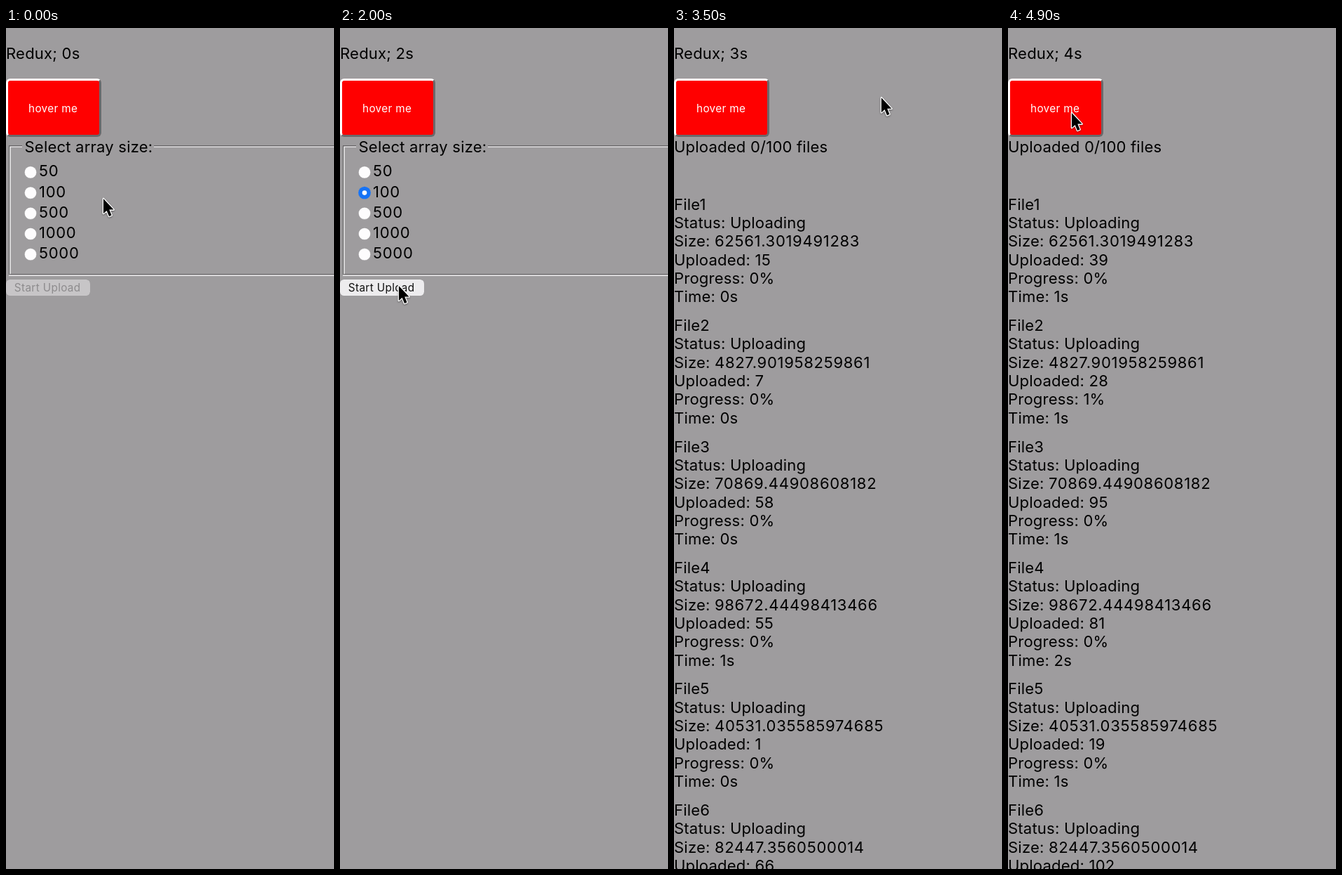
Animation of 468x1197 px, one loop 5 s. Source, as an HTML page:

```html
<!DOCTYPE html>
<html lang="en">
<head>
<meta charset="utf-8">
<title>Upload demo</title>
<style>
  html, body { margin: 0; width: 100%; height: 100%; overflow: hidden; background: #9e9c9e; }
  svg { display: block; position: absolute; left: 0; top: 0; }
  text { font: 22.1px Inter, "Noto Sans", sans-serif; letter-spacing: .18px; white-space: pre; }
  .number { letter-spacing: .65px; }
  .small { font-size: 15.3px; letter-spacing: .35px; }
  #hover {
    position: absolute; left: 0; top: 72px; width: 136px; height: 83px;
    box-sizing: border-box; border: 3px solid; border-radius: 6px;
    border-color: #fff #6b696b #6b696b #fff;
  }
  .dark { stroke: #666466; stroke-width: 1.4; fill: none; }
  .light { stroke: #efeeef; stroke-width: 1.4; fill: none; }
  .radio { fill: #fdfcfd; stroke: #868486; stroke-opacity: .45; stroke-width: .8; }
  #upload { filter: drop-shadow(0 .7px .7px #0005); }
  #cursor { filter: drop-shadow(0 1.5px 1.2px #0006); }
</style>
</head>
<body>
<div id="hover"></div>
<svg width="468" height="1197" viewBox="0 0 468 1197">
  <text id="clock" x="0" y="44"></text>
  <text class="small" x="32" y="120" fill="#fff">hover me</text>
  <g id="form">
    <path class="dark" d="M23 167.7H4.6V352M211 167.7H468M6 350.8H468"/>
    <path class="light" d="M23 169.1H6V350M211 169.1H468M4 352.2H468"/>
    <text x="26.5" y="177">Select array size:</text>
    <g id="options"></g>
    <g id="picked">
      <circle cx="35" cy="234.6" r="8.9" fill="#1673f5"/>
      <circle cx="35" cy="234.6" r="3.3" fill="#fff"/>
    </g>
    <rect id="upload" x="0" y="358" width="120" height="23" rx="5.5"/>
    <text id="uploadLabel" class="small" x="11.8" y="375">Start Upload</text>
  </g>
  <g id="list">
    <text x="0" y="177">Uploaded 0/100 files</text>
  </g>
  <path id="cursor" d="M0 0V21L4.7 16.9 8.1 25 11.6 23.5 8.3 15.6H14.6Z"
        fill="#000" stroke="#fff" stroke-width="2.6" stroke-linejoin="round" paint-order="stroke"/>
</svg>
<script>
const LOOP = 5000, STEP = 100;
const PICK = 800, PRESS = 1900, RELEASE = 2200, SHOW = 2300;
const UPLOAD_START = 2500, UPLOAD_SPAN = 2400;
const $ = id => document.getElementById(id);

// Stops of the pointer tip; it eases from one to the next.
const STOPS = [
  { t: 0, x: 138, y: 242 },
  { t: 400, x: 78, y: 291 },
  { t: PICK, x: 34, y: 232 },
  { t: 1400, x: 82, y: 365 },
  { t: 2100, x: 83, y: 366 },
  { t: 2600, x: 192, y: 171 },
  { t: 3410, x: 316, y: 97 },
  { t: 3905, x: 50, y: 112 },
  { t: 4400, x: 316, y: 97 },
  { t: 4800, x: 269, y: 101 },
  { t: 4900, x: 90, y: 120 }
];

// Counts grow to `total` along a power curve; `start` is when the file's own clock begins.
const FILES = [
  { size: "62561.3019491283", total: 39, power: 1.1, start: 2950 },
  { size: "4827.901958259861", total: 28, power: 1.6, start: 3450 },
  { size: "70869.44908608182", total: 95, power: .57, start: 2950 },
  { size: "98672.44498413466", total: 81, power: .44, start: 2450 },
  { size: "40531.035585974685", total: 19, power: 3, start: 3450 },
  { size: "82447.3560500014", total: 102, power: .5, start: 2950 }
];

function add(parent, tag, attrs, content = "") {
  const node = document.createElementNS("http://www.w3.org/2000/svg", tag);
  for (const key in attrs) node.setAttribute(key, attrs[key]);
  node.textContent = content;
  parent.append(node);
  return node;
}

const show = (id, visible) => { $(id).style.display = visible ? "" : "none"; };
const clamp = u => Math.min(1, Math.max(0, u));
const ease = u => (1 - Math.cos(Math.PI * u)) / 2;

function pointerAt(t) {
  const next = STOPS.findIndex(stop => stop.t > t);
  if (next < 0) return STOPS[STOPS.length - 1];
  const a = STOPS[next - 1], b = STOPS[next];
  const k = ease((t - a.t) / (b.t - a.t));
  return { x: a.x + k * (b.x - a.x), y: a.y + k * (b.y - a.y) };
}

[50, 100, 500, 1000, 5000].forEach((n, i) => {
  const y = 205.4 + 29.2 * i;
  add($("options"), "circle", { class: "radio", cx: 35, cy: y, r: 8.6 });
  add($("options"), "text", { class: "number", x: 47, y: y + 5.9 }, n);
});

FILES.forEach((file, i) => {
  const line = (row, content) =>
    add($("list"), "text", { x: 0, y: 258.6 + 172.45 * i + 26.35 * row }, content);
  line(0, `File${i + 1}`);
  line(1, "Status: Uploading");
  add(line(2, "Size: "), "tspan", { class: "number" }, file.size);
  file.uploaded = line(3);
  file.progress = line(4);
  file.time = line(5);
});

function draw(t) {
  // The clock runs a little slow because the page is busy.
  $("clock").textContent = `Redux; ${Math.floor((t + 865) / 1155)}s`;

  const phase = t % 680;
  $("hover").style.backgroundColor = phase >= 180 && phase < 520 ? "#00f" : "#f00";

  const picked = t >= PICK, pressed = t >= PRESS && t < RELEASE, listed = t >= SHOW;
  show("form", !listed);
  show("list", listed);
  show("picked", picked);
  $("upload").setAttribute("fill", !picked ? "#c7c5c7" : pressed ? "#edecee" : "#fff");
  $("uploadLabel").setAttribute("fill", picked ? "#111" : "#8d8b8d");

  const done = clamp((t - UPLOAD_START) / UPLOAD_SPAN);
  for (const file of FILES) {
    const count = Math.round(file.total * done ** file.power);
    const seconds = Math.max(0, Math.floor((t - file.start) / 1000));
    file.uploaded.textContent = `Uploaded: ${count}`;
    file.progress.textContent = `Progress: ${Math.round(100 * count / file.size)}%`;
    file.time.textContent = `Time: ${seconds}s`;
  }

  const { x, y } = pointerAt(t);
  $("cursor").setAttribute("transform", `translate(${x + 1} ${y + 1})`);
}

const begin = performance.now();
function frame() {
  const t = (performance.now() - begin) % LOOP;
  draw(Math.floor(t / STEP) * STEP);
  requestAnimationFrame(frame);
}
frame();
</script>
</body>
</html>
```
